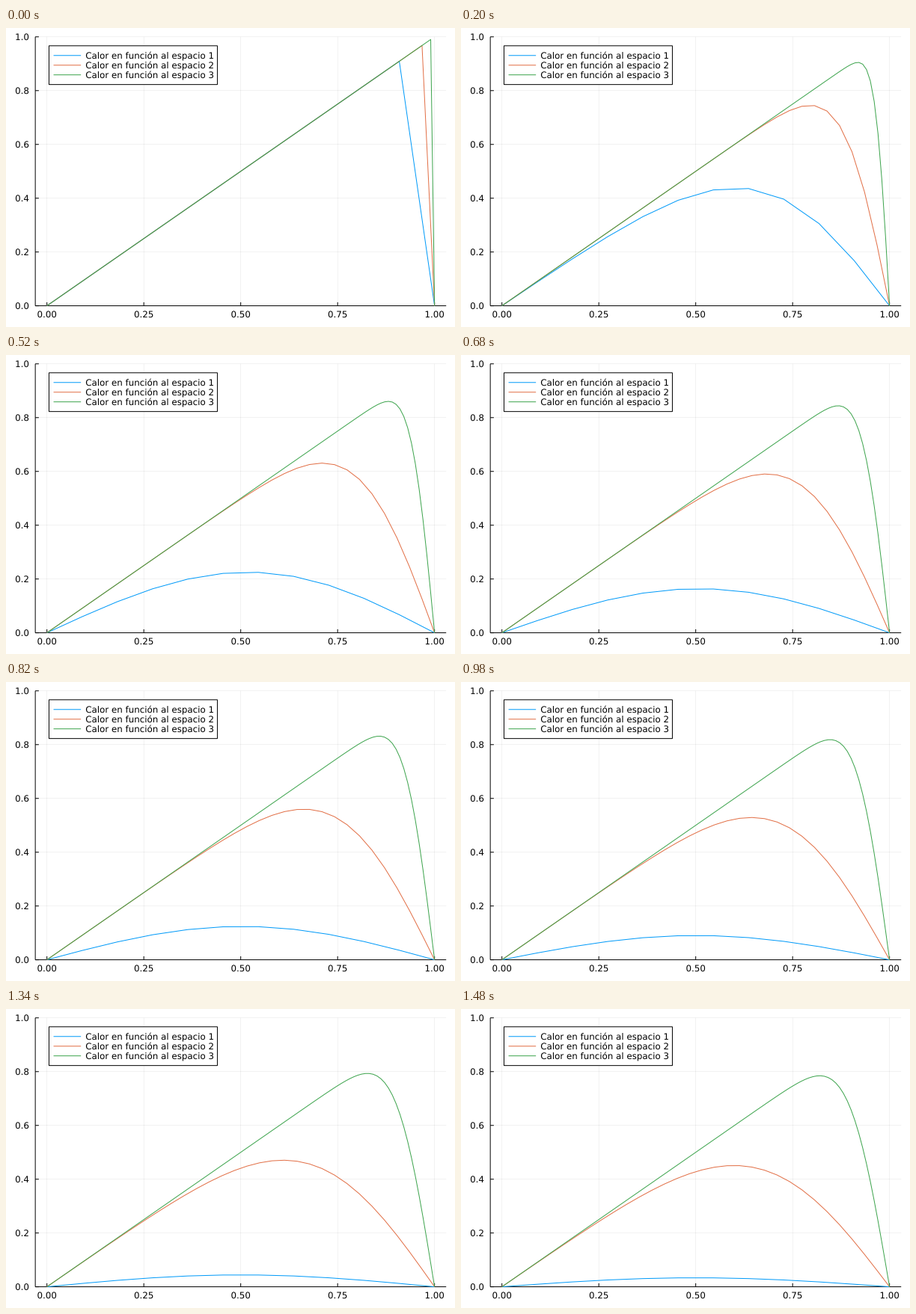
Write a matplotlib script that moves like this. It is 600 px wide and 400 px high and loops after 1500 ms.

```python
import numpy as np
import matplotlib.pyplot as plt
from matplotlib.animation import FuncAnimation
from matplotlib.patches import PathPatch, Rectangle
from matplotlib.textpath import TextPath

W, H, DPI = 600, 400, 100
FRAMES, INTERVAL = 75, 20
LEFT, RIGHT, TOP, BOTTOM = 39.15, 588.19, 11.81, 371.61
FONT_PX = 11.85
R = 0.5  # diffusion number of the implicit scheme
SERIES = [(10, "#009af9"), (30, "#e26f46"), (100, "#3da44d")]

plt.rcParams["path.simplify"] = False
fig = plt.figure(figsize=(W / DPI, H / DPI), dpi=DPI, facecolor="white")
ax = fig.add_axes([0, 0, 1, 1])
ax.set(xlim=(0, W), ylim=(0, H))
ax.axis("off")


def px(x):
    return LEFT + (x + 0.03) / 1.06 * (RIGHT - LEFT)


def py(y):
    return BOTTOM - y * (BOTTOM - TOP)


def line(xs, ys, color="black", width=1.0, **kw):
    """Polyline in pixels, y measured from the top."""
    (artist,) = ax.plot(xs, H - np.asarray(ys), color=color, lw=width * 72 / DPI,
                        solid_capstyle="butt", solid_joinstyle="round", **kw)
    artist.set_snap(False)
    return artist


def label(x, baseline, text, align=0.0):
    """Text at sub-pixel position; align 0 is left, 0.5 centre, 1 right."""
    units = sum(0.318 if c == "." else 0.636 for c in text) if align else 0
    path = TextPath((x - align * units * FONT_PX, H - baseline), text,
                    size=FONT_PX, prop={"family": "DejaVu Sans"})
    ax.add_patch(PathPatch(path, facecolor="black", lw=0, snap=False, zorder=6))


def diffuse(n):
    """Implicit heat steps on n inner nodes, both ends held at zero."""
    x = np.linspace(0, 1, n + 2)
    system = (1 + 2 * R) * np.eye(n) - R * (np.eye(n, k=1) + np.eye(n, k=-1))
    step = np.linalg.inv(system)
    u = x.copy()
    u[-1] = 0
    states = [u]
    for _ in range(FRAMES - 1):
        u = u.copy()
        u[1:-1] = step @ u[1:-1]
        states.append(u)
    return x, states


# Grid, axes and tick labels
TICK = 4.72
for v in np.linspace(0, 1, 5):
    x = px(v)
    line([x, x], [BOTTOM, TOP], width=0.5, alpha=0.1, zorder=1)
    line([x, x], [BOTTOM, BOTTOM - TICK], zorder=2)
    label(x, 387.21, f"{v:.2f}", 0.5)
for v in np.linspace(0, 1, 6):
    y = py(v)
    line([LEFT, RIGHT], [y, y], width=0.5, alpha=0.1, zorder=1)
    line([LEFT, LEFT + TICK], [y, y], zorder=2)
    label(30.93, y + 4.32, f"{v:.1f}", 1)
line([LEFT, RIGHT], [BOTTOM, BOTTOM], zorder=2)
line([LEFT, LEFT], [BOTTOM, TOP], zorder=2)

# Legend
ax.add_patch(Rectangle((57.45, H - 75.64), 225.0, 51.84, facecolor="white",
                       edgecolor="black", lw=72 / DPI, snap=False, zorder=4))
for i, (_, color) in enumerate(SERIES):
    y = 36.76 + 12.96 * i
    line([63.55, 100.15], [y, y], color, zorder=5)
    label(106.25, y + 4.32, f"Calor en función al espacio {i + 1}")

# Curves
curves = []
for n, color in SERIES:
    x, states = diffuse(n)
    curves.append((line(px(x), py(states[0]), color, zorder=3), states))


def update(frame):
    for curve, states in curves:
        curve.set_ydata(H - py(states[frame]))
    return [curve for curve, _ in curves]


anim = FuncAnimation(fig, update, frames=FRAMES, interval=INTERVAL,
                     repeat=True, repeat_delay=0, blit=False)
plt.show()
```
